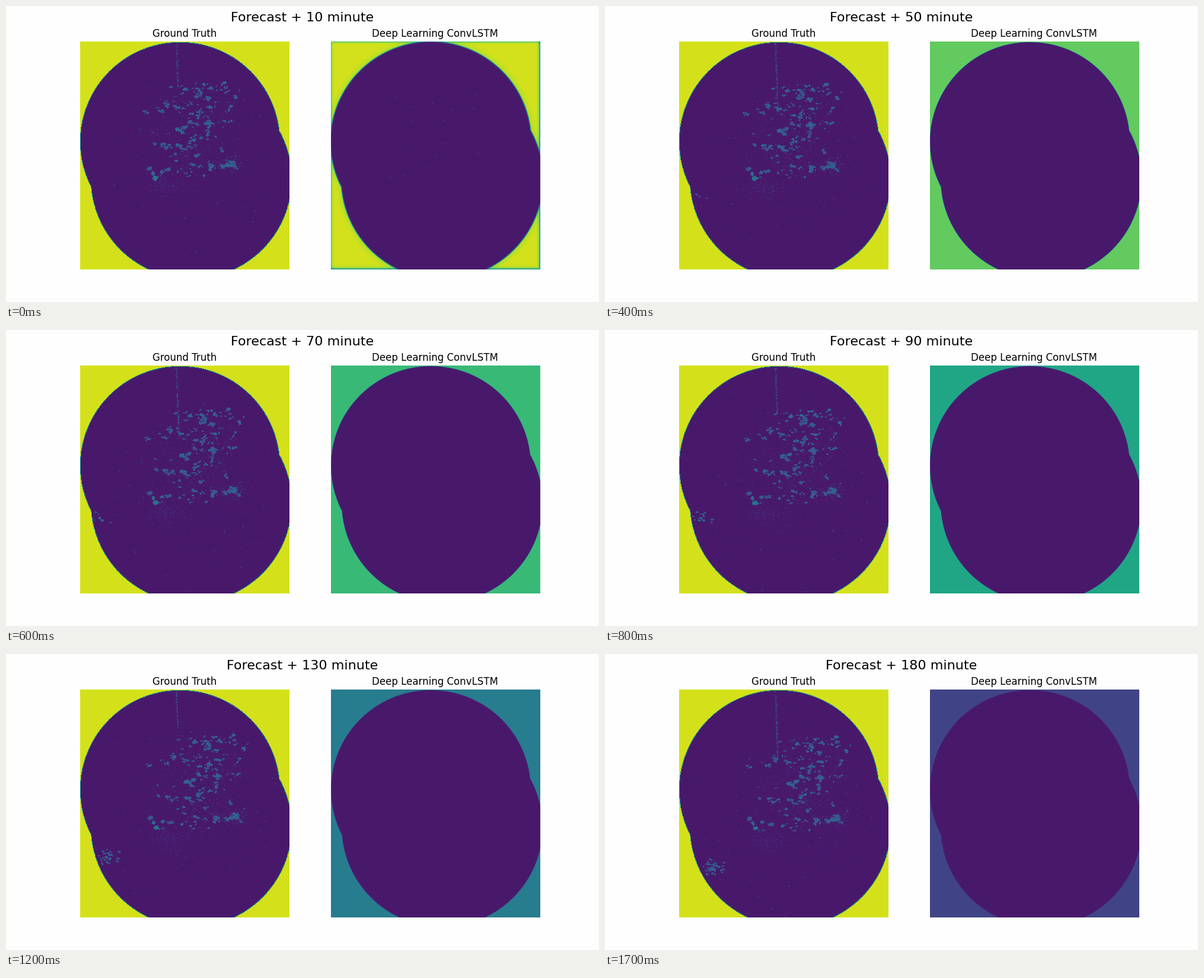
Animation, 1000 px wide and 500 px high, one loop 1.8 s. Source, as a matplotlib script:

```python
import numpy as np
import matplotlib.pyplot as plt
from matplotlib.animation import FuncAnimation

W, H = 352, 385
LEFT, TOP = 125, 60            # stage position of the left panel
FRAMES = 18
SEA, RIM, LAND = 0.07, 0.5, 0.936

rows, cols = np.mgrid[:H, :W]
px, py = cols + LEFT + 0.5, rows + TOP + 0.5
texture = np.random.default_rng(4).random((H, W))
# Signed distance to the coverage outline: negative inside.
outside = np.minimum(np.hypot(px - 293, py - 229) - 168,
                     np.hypot(px - 312, py - 292) - 169)


def smooth(t):
    t = np.clip(t, 0, 1)
    return t * t * (3 - 2 * t)


def stamp(img, x, y, rx, ry, value, tilt=-0.3):
    """Add a ragged tilted ellipse at a stage position."""
    x, y, reach = x - LEFT, y - TOP, int(max(rx, ry) * 1.4) + 2
    win = (slice(max(int(y) - reach, 0), max(int(y) + reach, 0)),
           slice(max(int(x) - reach, 0), max(int(x) + reach, 0)))
    dx, dy = cols[win] - x, rows[win] - y
    u = (dx * np.cos(tilt) + dy * np.sin(tilt)) / rx
    v = (dy * np.cos(tilt) - dx * np.sin(tilt)) / ry
    noise = texture[win]
    hit = u * u + v * v < 0.5 + 0.8 * noise
    img[win] = np.where(hit, np.maximum(img[win], value + 0.06 * (noise - 0.5)), img[win])


def scatter(img, x, y, values):
    c, r = np.asarray(x - LEFT, int), np.asarray(y - TOP, int)
    ok = (c >= 0) & (c < W) & (r >= 0) & (r < H)
    img[r[ok], c[ok]] = np.maximum(img[r[ok], c[ok]], values[ok])


def drift(x, y, minute):
    age = minute - 10
    speed = 0.12 * np.clip((x - 205) / 90, 0, 1) * np.where(y > 262, 0.5, 1)
    return x + speed * age, y + 0.065 * age


def clump(img, rng, x, y, size, minute):
    """Draw one echo as a few parts that slowly swell and shrink."""
    x, y = drift(x, y, minute)
    for _ in range(2 + int(size)):
        ox, oy = rng.normal(0, size * 0.9), rng.normal(0, size * 0.6)
        r = size * rng.uniform(0.55, 1) * (1 + 0.25 * np.sin(rng.uniform(0, 6.3) + minute / 35))
        stamp(img, x + ox, y + oy, r * 1.2, r * 0.8, rng.uniform(0.22, 0.33),
              rng.uniform(-0.6, 0.3))


def echoes(img, minute):
    rng = np.random.default_rng(11)
    for i in range(125):
        if i % 3:                                   # wide northern field
            y = rng.uniform(130, 212)
            x = rng.triangular(208 + abs(y - 185) * 0.7, 325, 398)
        else:                                       # sparser southern field
            y = rng.uniform(212, 290)
            x = rng.triangular(240, 340, 400)
        clump(img, rng, x, y, 1.2 + min(rng.exponential(0.9), 2), minute)
    for _ in range(9):                              # eastern bank
        clump(img, rng, rng.normal(376, 9), rng.normal(267, 4), 2.6, minute)
    for _ in range(5):                              # central bank
        clump(img, rng, rng.normal(287, 12), rng.normal(238, 2.5), 2.4, minute)


def strong_cell(img, minute):
    x, y = 251 + minute * 0.012, 290 + minute * 0.02
    stamp(img, x, y, 4.6, 4.6 - minute * 0.008, 0.38)
    stamp(img, x - 4, y - 8, 3, 4, 0.32)
    stamp(img, x - 10, y - 16, 5, 3.5, 0.27)
    stamp(img, x + 11, y - 10, 4, 3, 0.3)


def cloud(img, rng, n, center, spread, low, high, minute):
    x, y = drift(rng.normal(center[0], spread[0], n),
                 rng.normal(center[1], spread[1], n), minute)
    scatter(img, x, y, rng.uniform(low, high, n))


def dust(img, minute):
    rng = np.random.default_rng(23)
    cloud(img, rng, 450, (308, 218), (42, 42), 0.1, 0.24, minute)
    cloud(img, rng, 260, (325, 312), (55, 32), 0.09, 0.14, minute)
    cloud(img, rng, 100, (265, 305), (16, 9), 0.12, 0.26, minute)
    cloud(img, rng, 110, (375, 267), (12, 7), 0.15, 0.32, minute)


def flecks(img, minute):
    """Short tangential dashes that change at every step."""
    rng = np.random.default_rng(100 + minute)
    for _ in range(55):
        a, d = rng.uniform(0, 6.28), 160 * np.sqrt(rng.random())
        cx, cy = (293, 229) if rng.random() < 0.35 else (312, 292)
        stamp(img, cx + d * np.cos(a), cy + d * np.sin(a),
              rng.uniform(0.8, 2), 0.6, rng.uniform(0.12, 0.25), a + 1.57)


def beam(img, minute):
    end = 150 + 30 * np.sin((minute - 20) / 20.7)
    rng = np.random.default_rng(300 + minute)
    y = rng.uniform(61, end, int((end - 60) * 1.5))
    scatter(img, 287.5 + (y - 60) * 0.035 + rng.normal(0, 0.9, y.size), y,
            rng.uniform(0.18, 0.36, y.size))


def shower(img, minute):
    """Late echoes that gather in the south-west."""
    x = 155 + 0.2 * (minute - 40)
    y = 316 + 44 * smooth((minute - 105) / 45)
    amount = np.clip((minute - 40) / 120, 0, 1)
    rng = np.random.default_rng(31)
    for _ in range(int(42 * amount)):
        stamp(img, x + rng.normal(0, 8), y + rng.normal(0, 7),
              rng.uniform(1.2, 3.2), rng.uniform(0.9, 2.2), rng.uniform(0.2, 0.34), 0.3)


def truth(minute):
    img = np.full((H, W), SEA)
    for layer in (dust, flecks, echoes, strong_cell, beam, shower):
        layer(img, minute)
    img[(outside > -1.1 + 0.5 * texture) & (outside < 0.3)] = RIM
    img[outside >= 0.3] = LAND
    return img


def faint_echoes(img, minute):
    rng = np.random.default_rng(8)
    for _ in range(16):
        x, y = rng.normal(725, 45), rng.uniform(135, 292)
        if minute <= 10 + rng.exponential(25):
            stamp(img, x - (548 - LEFT), y, 2.6, 1.7, 0.095)


def forecast(minute):
    level = 0.847 - 0.00428 * (minute - 30)
    haze = np.clip((40 - minute) / 30, 0, 1) ** 2
    cover = smooth((outside + 0.8) / (1.6 + 1.8 * haze))
    near = np.minimum(cols, rows)
    far = np.minimum(W - 1 - cols, H - 1 - rows)
    cover *= 1 - haze * (0.25 * np.exp(-near / 1.3) + 0.5 * np.exp(-far / 1.6))
    cover *= 1 - 0.06 * haze * np.exp(-(np.clip(outside, 0, None) / 7) ** 2)
    img = SEA + (level - SEA) * cover
    faint_echoes(img, minute)
    return img


plt.rcParams["font.family"] = "DejaVu Sans"
fig, axes = plt.subplots(1, 2, figsize=(10, 5), dpi=100, facecolor="#fefefe")
heading = fig.suptitle("", fontsize=16)
pictures = []
for ax, name in zip(axes, ("Ground Truth", "Deep Learning ConvLSTM")):
    ax.set_title(name, fontsize=12)
    ax.axis("off")
    pictures.append(ax.imshow(np.zeros((H, W)), cmap="viridis", vmin=0, vmax=1,
                              aspect="auto", interpolation="nearest"))


def update(step):
    minute = 10 * (step + 1)
    heading.set_text(f"Forecast + {minute} minute")
    pictures[0].set_data(truth(minute))
    pictures[1].set_data(forecast(minute))
    return [heading, *pictures]


anim = FuncAnimation(fig, update, frames=FRAMES, interval=100, repeat=True,
                     repeat_delay=0, blit=False)
plt.show()
```
